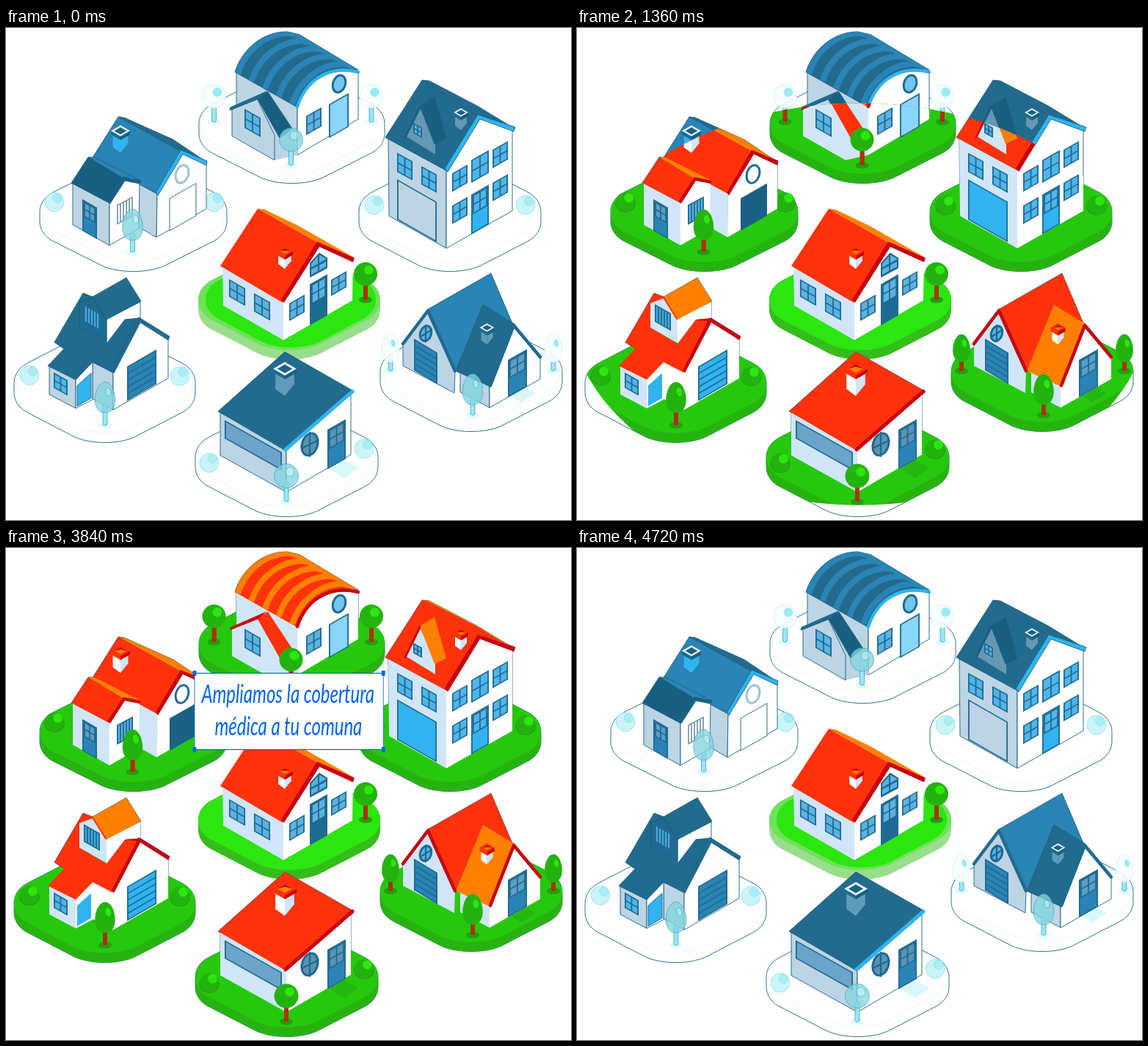
These frames come from a looping animation (770 by 670 pixels, 5.72 s). An HTML page:

```html
<!DOCTYPE html>
<html lang="es">
<head>
<meta charset="utf-8">
<title>Cobertura</title>
<style>
html, body { margin: 0; width: 100%; height: 100%; overflow: hidden; background: #fff; }
svg { display: block; width: 100vw; height: 100vh; }
text { font-family: Lato, "Open Sans", sans-serif; font-style: italic; fill: #0062fb; text-anchor: middle; }
</style>
</head>
<body>
<svg id="stage" viewBox="0 0 770 670"></svg>
<script>
const RED = '#ff320c', ORANGE = '#ff8000', CRIMSON = '#c60411', SHADE = '#d0e6f8', WHITE = '#fff';
const NAVY = '#1f6a92', DEEP = '#195f80', STEEL = '#2a84b5', SKY = '#30b3f0', MIST = '#bcd4e4', LINE = '#1a6183';
const PANE = '#5cb2e0', PALE = '#84d2f6', SLATE = '#226b8e';
const col = [], blue = [];

// Every part goes into the coloured layer and, with its second fill, into the blue one.
function put(shape, fill, blueFill, line = true) {
  if (fill) col.push(`<${shape} fill="${fill}"/>`);
  if (blueFill) blue.push(`<${shape} fill="${blueFill}"${line ? ` stroke="${LINE}" stroke-width=".9"` : ''}/>`);
}
const poly = (pts, f, bf, line) => put(`polygon points="${pts}"`, f, bf, line);
const path = (d, f, bf, line) => put(`path d="${d}"`, f, bf, line);
const oval = (x, y, rx, ry, f, bf, turn = 0) =>
  put(`ellipse cx="${x}" cy="${y}" rx="${rx}" ry="${ry}" transform="rotate(${turn} ${x} ${y})"`, f, bf, false);
function stroke(d, width, c, b) {
  const s = k => `<path d="${d}" fill="none" stroke="${k}" stroke-width="${width}" stroke-linejoin="round" stroke-linecap="round"/>`;
  col.push(s(c));
  blue.push(s(b));
}

const skew = (x, y, w, h, s) => `${x},${y} ${x + w},${y + w * s} ${x + w},${y + w * s + h} ${x},${y + h}`;

// Framed panel on a slanted wall with n by m panes.
function panes(x, y, w, h, s, n = 2, m = 2, glass = PANE, frame = NAVY, bGlass = glass, bFrame = frame) {
  poly(skew(x, y, w, h, s), frame, bFrame, false);
  const gap = 1.8, pw = (w - gap * (n + 1)) / n, ph = (h - gap * (m + 1)) / m;
  for (let i = 0; i < n; i++) for (let j = 0; j < m; j++) {
    const dx = gap + i * (pw + gap);
    poly(skew(x + dx, y + dx * s + gap + j * (ph + gap), pw, ph, s), glass, bGlass, false);
  }
}
function door(x, y, w, h, s, fill, glass = PANE, top = .48) {
  panes(x, y, w, h, s, 1, 1, fill);
  panes(x + 2, y + 2 + 2 * s, w - 4, h * top, s, 2, 2, glass);
}
function porthole(x, y, rx, ry, glass, cross, bGlass = glass, bFrame = NAVY) {
  oval(x, y, rx, ry, NAVY, bFrame, 18);
  oval(x, y, rx - 3, ry - 3, glass, bGlass, 18);
  if (cross) stroke(`M${x},${y - ry + 1}V${y + ry - 1}M${x - rx + 1},${y + 5}L${x + rx - 1},${y - 5}`, 2.4, NAVY, NAVY);
}
function chimney(x, y, r, h, body, bTop = LINE) {
  const q = r * .58, b = r * .8;
  poly(`${x - b},${y + 4} ${x},${y + q + 4} ${x},${y + h} ${x - b},${y + h - q}`, WHITE, body, false);
  poly(`${x + b},${y + 4} ${x},${y + q + 4} ${x},${y + h} ${x + b},${y + h - q * 1.7}`, SHADE, body, false);
  poly(`${x - r},${y} ${x},${y + q} ${x + r},${y} ${x + r},${y + 5} ${x},${y + q + 5} ${x - r},${y + 5}`, RED, NAVY, false);
  poly(`${x + r},${y} ${x},${y + q} ${x},${y + q + 5} ${x + r},${y + 5}`, CRIMSON, DEEP, false);
  poly(`${x - r},${y} ${x},${y - q} ${x + r},${y} ${x},${y + q}`, RED, '#e4f2fa', false);
  const i = r * .62, j = q * .62;
  poly(`${x - i},${y} ${x},${y - j} ${x + i},${y} ${x},${y + j}`, CRIMSON, bTop, false);
  poly(`${x - i},${y} ${x},${y - j + 3} ${x + i},${y} ${x},${y + j}`, ORANGE, bTop, false);
}

// Rounded isometric slab.
const rim = (x, y, w, h) =>
  `C${x - w},${y + .16 * h} ${x - .95 * w},${y + .32 * h} ${x - .83 * w},${y + .42 * h}` +
  `L${x - .33 * w},${y + .89 * h}C${x - .15 * w},${y + 1.037 * h} ${x + .15 * w},${y + 1.037 * h} ${x + .33 * w},${y + .89 * h}` +
  `L${x + .83 * w},${y + .42 * h}C${x + .95 * w},${y + .32 * h} ${x + w},${y + .16 * h} ${x + w},${y}`;
const slab = (x, y, w, h, d) =>
  `M${x - w},${y + d / 2}${rim(x, y + d / 2, w, h)}L${x + w},${y - d / 2}${rim(x, y - d / 2, -w, -h)}Z`;
function lawn(x, y, w) {
  path(slab(x, y, w, 68, 13), '#27b30f', WHITE);
  path(slab(x, y - 6.5, w, 68, 0), '#26c80e');
  blue.push(`<path d="${slab(x, y - 6.5, w - 3, 67, 0)}" fill="none" stroke="#dcf8fb" stroke-dasharray="3 2"/>`);
}

// Tree looks in the blue layer: leaf, edge, spot, opacity.
const FRONT = ['#83d6df', '#3fa5b8', '#a5e9f0', .78];
const FAINT = ['#f8feff', '#c4f4f9', '#8fe9f3', .9];
const BUSH = ['#c2f3f7', '#86e2ec', '#9cebf3', .85];
function tree(x, y, rx, ry, base, look) {
  const [leaf, edge, spot, alpha] = look, pear = ry > rx + 2;
  const crown = pear
    ? `path d="M${x},${y - ry}C${x + rx},${y - ry} ${x + rx * 1.5},${y + ry} ${x},${y + ry}C${x - rx * 1.5},${y + ry} ${x - rx},${y - ry} ${x},${y - ry}"`
    : `circle cx="${x}" cy="${y}" r="${rx}"`;
  const glint = pear
    ? `ellipse cx="${x + rx * .4}" cy="${y - ry * .3}" rx="${rx * .26}" ry="${ry * .28}" transform="rotate(-12 ${x} ${y})"`
    : `circle cx="${x + 4.5}" cy="${y - 5.5}" r="6.3"`;
  if (base) {
    oval(x, base, 9, 4.5, '#20a00e', '#e2fafc');
    const top = pear ? y + ry * .5 : y + 8;
    put(`rect x="${x - 3}" y="${top}" width="6" height="${base - top}" rx="1"`, '#9c3a10');
    put(`rect x="${x - .5}" y="${top}" width="3.5" height="${base - top}"`, '#bb2a12');
    blue.push(`<rect x="${x - 3}" y="${top}" width="6" height="${base - top}" rx="2" fill="#9be6f2" stroke="#3aa7bd" stroke-width=".8"/>`);
  }
  put(crown, '#23b30e');
  put(glint, '#2ee60f');
  blue.push(`<g opacity="${alpha}"><${crown} fill="${leaf}" stroke="${edge}" stroke-width=".9"/><${glint} fill="${spot}" stroke="${edge}" stroke-width=".8"/></g>`);
}
const bush = (x, y) => {
  oval(x, y + 2, 14, 12, '#22a30e');
  tree(x, y, 13, 13, 0, BUSH);
};

function homeCentre() {
  poly('295,324 378,372 378,425 296,378', SHADE);
  poly('378,372 427,295 473,316 472,371 378,425', WHITE);
  poly('343,246 352,247 398,269 475,313 426,293', ORANGE);
  poly('343,246 426,293 377,374 292,324', RED);
  poly('375,370 424,291 475,313 473,319 427,298 379,374', CRIMSON);
  panes(304, 342, 22, 24, .57);
  panes(338, 361, 22, 25, .57);
  panes(386, 375, 21, 24, -.57);
  panes(443, 343, 21, 22, -.57);
  door(414, 349, 24, 56, -.57, NAVY);
  poly('414,340 414,320 427,306 438,313 438,327', NAVY);
  poly('416,336 416,329 425,324 425,331', PANE);
  poly('427,330 427,323 436,318 436,325', PANE);
  poly('416,326 416,321 425,311 425,321', PANE);
  poly('427,320 427,309 436,314 436,315', PANE);
  chimney(380, 304, 11, 24);
  tree(490, 335, 16, 16, 370, FRONT);
}

function homeTop() {
  lawn(389.5, 137, 126.5);
  tree(283.5, 93, 16, 16, 128, FAINT);
  tree(498, 93, 16, 16, 128, FAINT);
  poly('314,60 397,107 397,173 314,126', SHADE, MIST);
  path('M397,108C407,76 435,48 480,58V124L397,173Z', WHITE, WHITE);
  path('M312,60C322,28 350,5 383,5L400,9L480,57C435,48 407,76 397,108Z', RED, SLATE);
  for (let i = 0; i < 5; i++) {
    const x = 316 + i * 18.5, y = 62 + i * 10.4;
    const band = f => `<path clip-path="url(#barrel)" d="M${x},${y}c10,-32 38,-55 71,-55l30,9" fill="none" stroke="${f}" stroke-width="8"/>`;
    col.push(band(ORANGE));
    blue.push(band(STEEL));
  }
  stroke('M397,107C407,76 435,49 480,60', 4.5, CRIMSON, SKY);
  porthole(454, 76, 10, 13.5, '#6fc6ee', false);
  panes(440, 104, 27, 46, -.57, 1, 1, PALE, NAVY);
  poly(skew(444, 105, 20, 41, -.57), '#8ad6f8', '#8ad6f8', false);
  panes(409, 120, 21, 26, -.57);
  poly('366,146 390,138 397,165 397,173 366,180', SHADE, MIST, false);
  poly('308,111 342,96 366,146 366,180 308,147', SHADE, MIST);
  poly('342,95 357,87 390,137 373,150', RED, DEEP);
  poly('305,112 306,108 356,86 343,97', CRIMSON, SLATE);
  panes(325, 110, 22, 26, .57);
  tree(388.5, 152, 16, 16, 187, FRONT);
}

function homeLeft() {
  lawn(173.5, 257, 127.5);
  bush(66, 237);
  bush(284, 237);
  poly('165,200 206,225 205,285 165,262', SHADE, MIST);
  poly('206,225 240,170 273,185 273,246 205,285', WHITE, WHITE);
  poly('153,121 161,122 228,152 274,183 240,169', ORANGE, SLATE);
  poly('153,121 240,169 206,226 117,178', RED, STEEL);
  poly('204,224 238,166 274,181 273,187 241,172 207,228', CRIMSON, SKY);
  porthole(240, 199, 10, 14, WHITE, false, WHITE, '#9fc0d2');
  poly(skew(223, 232, 36, 44, -.57), LINE, WHITE);
  chimney(156, 140, 13, 30, SKY);
  poly('91,211 141,237 141,296 91,268', SHADE, MIST);
  poly('141,238 162,206 182,211 181,273 141,296', WHITE, WHITE);
  poly('112,176 120,176 184,208 162,206', ORANGE, STEEL);
  poly('112,176 162,206 140,238 89,211', RED, DEEP);
  poly('138,236 160,203 184,208 182,212 162,208 142,239', CRIMSON, LINE);
  door(104, 233, 20, 43, .57, STEEL, '#5a9fc4');
  panes(151, 241, 22, 27, -.53, 5, 1, PANE, NAVY, WHITE, '#7d9cae');
  tree(172.5, 268, 14.5, 21, 305, FRONT);
}

function homeRight() {
  lawn(605, 257, 124);
  bush(502, 241);
  bush(708, 241);
  poly('521,151 600,194 600,300 522,256', SHADE, MIST);
  poly('600,194 645,122 690,138 690,249 600,300', WHITE, WHITE);
  poly('567,71 577,72 642,106 693,137 645,121', ORANGE, SLATE);
  poly('567,71 573,72 640,106 690,136 645,121', RED, SLATE, false);
  poly('567,71 645,121 600,194 517,149', RED, SLATE);
  poly('598,191 643,118 694,135 692,141 646,124 602,196', CRIMSON, SKY);
  poly('546,148 565,110 585,155 585,172', SHADE, '#6698b4', false);
  poly('564,106 584,94 600,150 584,158', ORANGE, DEEP);
  stroke('M544,149L564,107', 2.5, CRIMSON, DEEP);
  panes(555, 129, 12, 14, .57);
  chimney(620, 115, 10, 24, '#6698b4');
  panes(533, 170, 21, 26, .55, 2, 2, '#4fb5ea');
  panes(566, 188, 21, 25, .55, 2, 2, '#4fb5ea');
  panes(533, 206, 54, 55, .57, 1, 1, SKY, NAVY, MIST, NAVY);
  for (const [x, y, w, h] of [[608, 198, 21, 25], [634, 180, 24, 31], [663, 166, 21, 25], [608, 242, 21, 25], [663, 211, 21, 25]])
    panes(x, y, w, h, -.57, 2, 2, '#4fb5ea');
  door(634, 227, 24, 54, -.57, SKY, '#4fb5ea');
}

function homeLowLeft() {
  lawn(134.5, 490, 123.5);
  bush(32, 473);
  bush(237, 474);
  poly('118,455 146,468 146,520 118,505', WHITE, MIST);
  poly('146,469 182,398 221,422 221,477 146,520', WHITE, WHITE);
  poly('59,460 95,478 95,518 59,499', SHADE, MIST);
  poly('95,478 118,455 118,506 95,518', WHITE, WHITE);
  poly('137,396 183,373 183,398 160,402 137,430', WHITE, WHITE);
  poly('105,361 118,366 100,374 100,408 137,430 162,397 182,395 145,469 118,455 95,479 57,460 79,437 66,428', RED, SLATE);
  poly('144,466 181,394 223,420 221,425 183,401 147,470', CRIMSON, SLATE);
  poly('162,397 180,396 222,420 183,400', CRIMSON, SLATE, false);
  poly('100,374 119,366 137,396 137,429 100,408', SHADE, NAVY);
  poly('118,366 164,340 184,372 137,397', ORANGE, SLATE);
  stroke('M99,374L118,367L136,396', 2, RED, LINE);
  panes(106, 376, 22, 24, .57, 5, 1, '#49a7da');
  panes(65, 469, 19, 21, .57, 2, 2, '#4fb5ea');
  poly('97,487 116,470 116,504 97,515', SKY, SKY);
  panes(165, 461, 40, 47, -.58, 1, 5, SKY, NAVY, STEEL, NAVY);
  tree(135, 503, 14.5, 21, 541, FRONT);
}

function homeLowRight() {
  lawn(634, 475, 124);
  tree(524, 436, 12.5, 19, 467, FAINT);
  tree(746, 436, 12.5, 19, 467, FAINT);
  poly('684,498 704,487 722,497 702,510', '#24b70e', '#d9f7fa', false);
  poly('541,430 575,385 612,468 611,497 541,460', SHADE, MIST);
  poly('612,466 659,487 659,517 619,496 619,470', SHADE, MIST);
  poly('659,488 692,405 728,448 728,478 659,517', WHITE, WHITE);
  poly('575,383 661,334 690,402 650,377 614,468', RED, STEEL);
  poly('650,377 693,403 659,488 613,467', ORANGE, SLATE);
  stroke('M541,430L575,385L612,467', 4.5, CRIMSON, SLATE);
  stroke('M660,487L692,405L728,448', 4.5, CRIMSON, NAVY);
  porthole(572, 416, 9, 12, PANE, true);
  panes(556, 423, 32, 43, .6, 1, 5, STEEL);
  door(684, 452, 26, 51, -.57, STEEL, '#5a9fc4');
  chimney(655.5, 408, 10, 23, '#5f9cba');
  tree(636, 492, 14.5, 21, 527, FRONT);
}

function homeBottom() {
  lawn(382.5, 591, 124.5);
  bush(277, 592);
  bush(488, 573);
  poly('441,600 460,588 480,599 461,613', '#24b70e', '#d9f7fa', false);
  poly('292,523 382,575 382,632 292,582', SHADE, MIST);
  poly('382,575 470,497 470,581 382,632', WHITE, WHITE);
  poly('380,441 473,494 382,576 289,522', RED, SLATE);
  stroke('M381,574L472,495', 5, CRIMSON, SKY);
  panes(298, 534, 78, 25, .56, 1, 1, '#6aa5c9');
  porthole(414, 567, 12, 17, '#5a93b3', true);
  door(438, 547, 25, 54, -.57, STEEL, '#5a93b3');
  chimney(380, 464, 16, 37, '#5f9cba');
  tree(382, 610, 16.5, 16.5, 645, FRONT);
}

homeCentre();
const centre = col.splice(0).join('');
blue.length = 0;
[homeLeft, homeTop, homeRight, homeLowRight, homeLowLeft, homeBottom].forEach(draw => draw());

const corners = [[207, 170], [577, 170], [207, 274], [577, 274]];
document.getElementById('stage').innerHTML = `
<defs>
  <clipPath id="barrel"><path d="M312,60C322,28 350,5 383,5L400,9L480,57C435,48 407,76 397,108Z"/></clipPath>
  <clipPath id="iris"><ellipse id="hole" cx="385" cy="376"/></clipPath>
</defs>
<path id="edge" d="${slab(386, 377, 124, 68, 13)}" fill="#35bd1b"/>
<path id="grass" d="${slab(386, 370.5, 124, 68, 0)}" fill="#2be60f"/>
<path id="dim" d="${slab(388, 370, 116, 65, 0)}" fill="#2be60f"/>
${centre}
<g>${blue.join('')}</g>
<g clip-path="url(#iris)">${col.join('')}</g>
<g id="caption">
  <rect x="207" y="170.5" width="370" height="104" fill="#fff" stroke="#0062fb" stroke-width="1.2"/>
  ${corners.map(([x, y]) => `<rect x="${x - 3.5}" y="${y - 3}" width="7" height="7" fill="#0062fb"/>`).join('')}
  <text id="first" x="390" y="211" font-size="36">Ampliamos la cobertura</text>
  <text id="second" x="391" y="255" font-size="36">médica a tu comuna</text>
</g>`;

const el = id => document.getElementById(id);
const size = 36 * 339 / el('first').getComputedTextLength();
['first', 'second'].forEach(id => el(id).setAttribute('font-size', size.toFixed(2)));

const LOOP = 5720, TICK = 40, LAST = 22;

// Step of the reveal: -1 at rest, LAST when the caption is fully open.
function stepAt(t) {
  if (t < 1000) return -1;
  if (t < 3840) return Math.min(LAST, Math.floor((t - 1000) / TICK));
  return Math.max(-1, LAST - 1 - Math.floor((t - 3840) / TICK));
}

function render(t) {
  const i = stepAt(t), rest = i < 0;
  const rx = rest ? 0 : 113 + 36 * i - .5 * i * i;
  el('hole').setAttribute('rx', rx);
  el('hole').setAttribute('ry', rx / 1.45);
  el('edge').setAttribute('opacity', rest ? .5 : 1);
  el('grass').setAttribute('opacity', rest ? .4 : 1);
  const open = i < 15 ? 0 : Math.pow((i - 14) / 8, 2.72);
  el('caption').setAttribute('display', open ? 'inline' : 'none');
  el('caption').setAttribute('transform', `translate(${371 * (1 - open)} 0) scale(${open} 1)`);
}

const start = performance.now();
function loop() {
  render((performance.now() - start) % LOOP);
  requestAnimationFrame(loop);
}
render(0);
requestAnimationFrame(loop);
</script>
</body>
</html>
```
